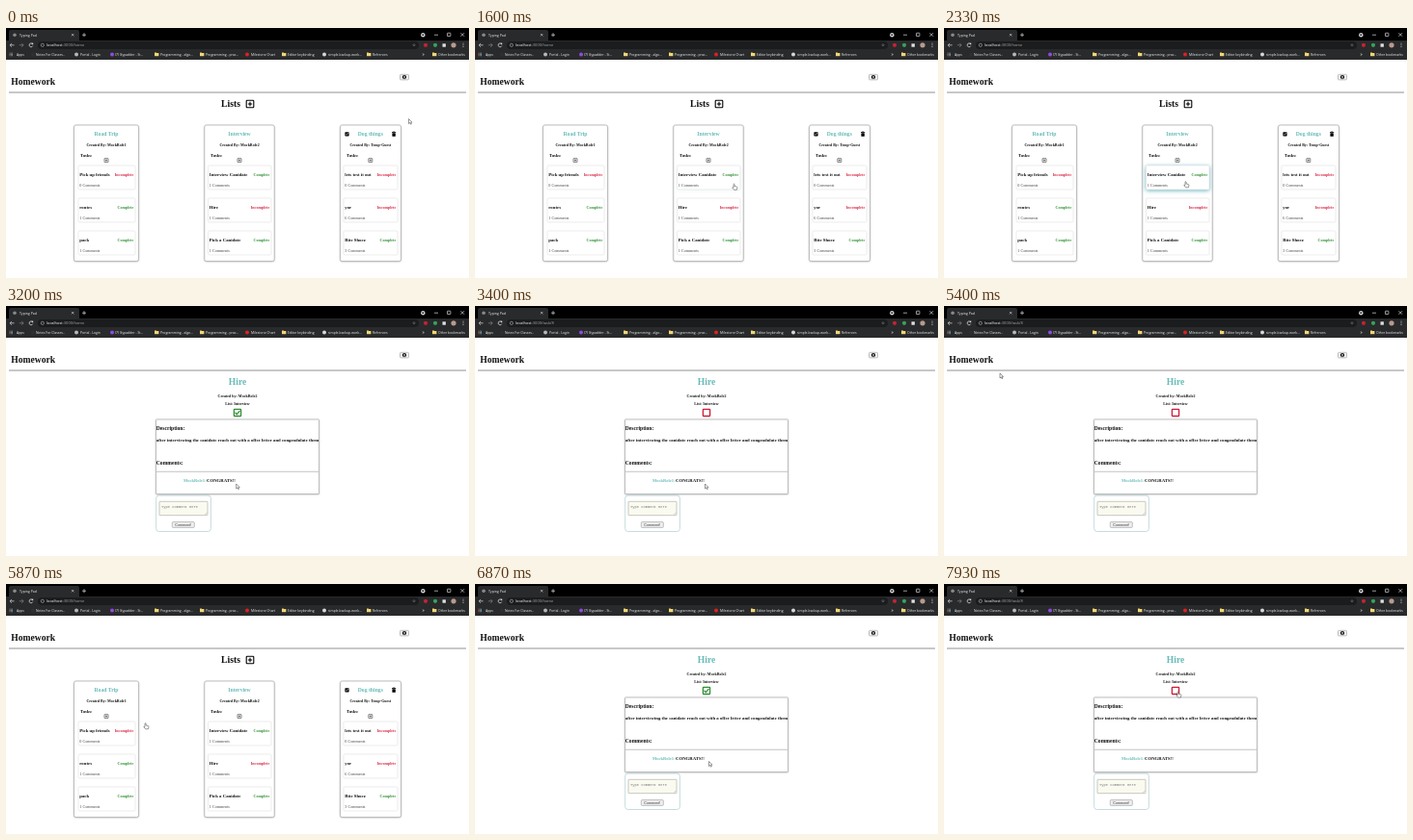
Write an HTML page with a canvas that moves like this. It is 480 px wide and 260 px high and loops after 8000 ms.

```html
<!DOCTYPE html>
<html lang="en">
<head>
<meta charset="utf-8">
<title>Homework lists</title>
<style>
html, body { margin: 0; width: 100%; height: 100%; overflow: hidden; background: #fff; }
canvas { display: block; width: 480px; height: 260px; }
</style>
</head>
<body>
<canvas id="stage" width="480" height="260"></canvas>
<script>
const ctx = document.getElementById('stage').getContext('2d');
const LOOP = 8000;
const SERIF = '"Liberation Serif", serif';
const SANS = '"Open Sans", sans-serif';
const TEAL = '#67bcb8', RED = '#dc2440', GREEN = '#2f9134';
const BAR = '#292a2c';

// Text is set at ten times its size and scaled down for even spacing.
function text(str, x, y, size, { color = '#111', font = SERIF, weight = 'bold', align = 'left' } = {}) {
  ctx.save();
  ctx.translate(x, y);
  ctx.scale(0.1, 0.1);
  ctx.font = `${weight} ${size * 10}px ${font}`;
  ctx.textAlign = align;
  ctx.fillStyle = color;
  ctx.fillText(str, 0, 0);
  ctx.restore();
}
const center = (str, x, y, size, color) => text(str, x, y, size, { color, align: 'center' });
const ui = (str, x, y, size = 3.4, color = '#f4f4f4') =>
  text(str, x, y, size, { color, font: SANS, weight: 'normal' });

function rect(x, y, w, h, color) {
  ctx.fillStyle = color;
  ctx.fillRect(x, y, w, h);
}

function box(x, y, w, h, r, { fill, stroke, width = 1, shadow, blur = 2 } = {}) {
  ctx.save();
  ctx.beginPath();
  ctx.roundRect(x, y, w, h, r);
  if (shadow) {
    ctx.shadowColor = shadow;
    ctx.shadowBlur = blur;
    ctx.shadowOffsetY = blur / 4;
  }
  if (fill) { ctx.fillStyle = fill; ctx.fill(); }
  ctx.shadowColor = 'transparent';
  if (stroke) { ctx.strokeStyle = stroke; ctx.lineWidth = width; ctx.stroke(); }
  ctx.restore();
}
const panel = (x, y, w, h, r) =>
  box(x, y, w, h, r, { fill: '#fff', stroke: '#b4b4b4', width: 0.8, shadow: 'rgba(0,0,0,.4)' });

function dot(x, y, r, color) {
  ctx.fillStyle = color;
  ctx.beginPath();
  ctx.arc(x, y, r, 0, Math.PI * 2);
  ctx.fill();
}

function line(points, color, width = 0.7) {
  ctx.strokeStyle = color;
  ctx.lineWidth = width;
  ctx.beginPath();
  points.forEach(([x, y]) => ctx.lineTo(x, y));
  ctx.stroke();
}

function plusBox(x, y, size, width, color) {
  const h = size / 2, p = size * 0.28;
  box(x - h, y - h, size, size, size * 0.1, { stroke: color, width });
  line([[x - p, y], [x + p, y]], color, width);
  line([[x, y - p], [x, y + p]], color, width);
}

function folder(x) {
  rect(x - 2, 25.5, 2, 1, '#e9c860');
  rect(x - 2, 26, 4.4, 3.2, '#f2d675');
}

const bookmarks = [
  ['dot', 28, '#303030', 'Notes For Classes..', 31],
  ['dot', 73, '#b8b8b8', 'Portal - Login', 77],
  ['dot', 110, '#8f4be0', '(7) lilypadder - St...', 113],
  ['folder', 156, '', 'Programming - algo...', 160],
  ['folder', 203, '', 'Programming - prac...', 207],
  ['dot', 250, '#e02020', 'Milestone Chart', 254],
  ['folder', 288, '', 'Editor keybinding', 292],
  ['dot', 330, '#d8d8d8', 'simple-backup-work...', 334],
  ['folder', 376, '', 'Refrences', 380],
  ['folder', 444, '', 'Other bookmarks', 448]
];

function drawBrowser(path) {
  const pale = '#dedede';
  rect(0, 0, 480, 13, '#000');
  rect(0, 13, 480, 20, BAR);
  box(3, 2, 73, 12, [2, 2, 0, 0], { fill: BAR });
  dot(9, 7.3, 1.8, '#8a8a8a');
  ui('Typing Pad', 14, 8.6, 3.5);
  line([[68, 6], [70.4, 8.4]], pale, 0.6);
  line([[70.4, 6], [68, 8.4]], pale, 0.6);
  line([[79, 7.2], [83, 7.2]], pale);
  line([[81, 5.2], [81, 9.2]], pale);
  dot(432.3, 7.2, 2.2, '#d4d4d4');
  dot(432.3, 7.2, 0.9, '#222');
  line([[444, 7.2], [448, 7.2]], pale);
  box(457.5, 5.2, 3.4, 3.4, 0.4, { stroke: pale, width: 0.7 });
  line([[471.5, 5.2], [475, 8.7]], pale);
  line([[475, 5.2], [471.5, 8.7]], pale);

  line([[8.5, 17.8], [4.2, 17.8]], pale);
  line([[6, 15.9], [4.1, 17.8], [6, 19.7]], pale);
  line([[13.8, 17.8], [18, 17.8]], '#888');
  line([[16.2, 15.9], [18.1, 17.8], [16.2, 19.7]], '#888');
  ctx.strokeStyle = pale;
  ctx.lineWidth = 0.8;
  ctx.beginPath();
  ctx.arc(26, 17.8, 1.9, 0.4, 5.5);
  ctx.stroke();
  rect(26.7, 15.6, 1.5, 1.5, pale);
  box(33, 14, 395, 8, 4, { fill: '#1b1c1e' });
  box(36.2, 16.2, 3.2, 3.2, 1.6, { stroke: '#bbb', width: 0.6 });
  ui('localhost', 42, 19.4, 4, '#fff');
  ctx.font = `40px ${SANS}`;
  ui(':3000/' + path, 42 + ctx.measureText('localhost').width / 10, 19.4, 4, '#a8a8a8');
  ui('☆', 421, 19.4, 4.5);
  dot(435, 17.8, 2.1, '#c52333');
  dot(445, 17.8, 2.1, '#35a45a');
  rect(452.5, 16.3, 3.4, 3.4, pale);
  dot(464, 17.8, 2.6, '#b99a8d');
  for (const y of [16, 17.8, 19.6]) dot(474, y, 0.5, pale);

  for (let i = 0; i < 9; i++)
    rect(3.5 + (i % 3) * 1.3, 25.7 + Math.floor(i / 3) * 1.3, 0.9, 0.9, ['#dc6a60', '#71b77d', '#7198d8'][i % 3]);
  ui('Apps', 11, 28.8);
  for (const [kind, x, color, label, labelX] of bookmarks) {
    if (kind === 'dot') dot(x, 27.4, 2, color);
    else folder(x);
    ui(label, labelX, 28.8);
  }
  ui('»', 431.5, 28.9, 4.5);
}

function drawHeader() {
  text('Homework', 5.3, 59.2, 9.6);
  box(408.5, 48.3, 9, 5.6, 1, { fill: '#f2f2f2', stroke: '#999', width: 0.6 });
  dot(413, 51.1, 2.1, '#000');
  dot(413, 50.4, 0.65, '#fff');
  rect(412, 51.5, 2, 0.8, '#fff');
  rect(3, 66.5, 474, 1, '#929292');
}

const lists = [
  { title: 'Road Trip', by: 'MockRole1', x: 70.5, w: 67, mid: 104, label: 77, left: 75, right: 134,
    tasks: [['Pick up friends', 0, 0], ['routes', 1, 1], ['pack', 1, 1]] },
  { title: 'Interview', by: 'MockRole2', x: 205.8, w: 72.4, mid: 242, label: 212, left: 209.5, right: 275,
    tasks: [['Interview Canidate', 1, 1], ['Hire', 0, 1], ['Pick a Canidate', 1, 1]] },
  { title: 'Dog things', by: 'Temp-Guest', x: 346.5, w: 63, mid: 377.8, label: 353, left: 350, right: 406,
    tasks: [['lets test it out', 0, 0], ['yor', 0, 6], ['Bite Shoez', 1, 3]] }
];
const rowTop = row => 143 + row * 34;

// Share of the last 100 ms that the pointer spent over a task.
function hoverLevel(t, list, row) {
  let inside = 0;
  for (let back = 0; back < 100; back += 10) {
    const [x, y] = pointerAt(Math.max(0, t - back));
    if (x > list.left && x < list.right && y > rowTop(row) && y < rowTop(row) + 25) inside++;
  }
  return inside / 10;
}

function drawTask(list, row, hover) {
  const [name, done, comments] = list.tasks[row];
  const y = rowTop(row), w = list.right - list.left;
  box(list.left, y, w, 25, 1.2, {
    fill: '#fff', stroke: '#e4e4e4', width: 0.7,
    shadow: hover && `rgba(40, 150, 165, ${hover * 0.8})`, blur: 4
  });
  text(name, list.left + 1.3, y + 11.2, 4.8);
  text(done ? 'Complete' : 'Incomplete', list.right - 1.7, y + 10.7, 4.1,
    { color: done ? GREEN : RED, align: 'right' });
  text(comments + ' Comments', list.left + 1.3, y + 21.9, 4.15, { color: '#444', weight: 'normal' });
}

function drawHome(t) {
  text('Lists', 223, 82, 9.7);
  plusBox(253, 79, 7.6, 1.1, '#000');
  for (const list of lists) {
    panel(list.x, 101, list.w, 141.5, 2);
    center(list.title, list.mid, 112, 5.7, TEAL);
    center('Created By: ' + list.by, list.mid, 122.5, 4);
    text('Tasks:', list.label, 133.8, 4.6);
    plusBox(list.mid, 137.6, 4, 0.55, '#222');
    list.tasks.forEach((_, row) => drawTask(list, row, hoverLevel(t, list, row)));
  }
  box(351.4, 108.2, 4.2, 4.2, 0.6, { fill: '#000' });
  line([[352.3, 110.5], [353.2, 111.3], [355, 109.1]], '#fff', 0.6);
  rect(400, 108, 4.2, 0.8, '#000');
  rect(401.4, 107.5, 1.4, 0.7, '#000');
  box(400.4, 109.2, 3.4, 3.6, 0.4, { fill: '#000' });
}

function drawTaskPage(done) {
  center('Hire', 240, 81.8, 9.6, TEAL);
  center('Created by: MockRole2', 240, 95.4, 4);
  center('List: Interview', 240, 103.3, 4);
  const mark = done ? GREEN : '#cf1b36';
  box(236.4, 107.3, 7.2, 7.2, 0.5, { fill: '#fff', stroke: mark, width: 1.3 });
  if (done) line([[237.6, 110.8], [239.3, 112.6], [242.5, 108.9]], mark, 1.3);

  box(155.6, 197, 56.8, 37.5, 3, { fill: '#fff', stroke: '#b9d4d7', width: 0.8 });
  panel(155.5, 118, 169, 77.5, 0.6);
  text('Description:', 155.8, 128.8, 5.6);
  text('after interviewing the canidate reach out with a offer letter and congradulate them', 155.8, 141.2, 4.79);
  text('Comments:', 155.8, 164.7, 5.6);
  rect(156, 171.8, 168, 0.8, '#b4b4b4');
  text('MockRole1:', 184, 182.8, 4.5, { color: TEAL });
  text('CONGRATS!!', 208, 182.8, 4.75);

  box(159, 203.3, 50, 14.4, 0.5, { fill: '#fafaf0', stroke: '#b2b2a8', width: 0.7 });
  text('Type Comment Here', 161, 209.8, 3.73, { color: '#777', font: '"Liberation Mono", monospace', weight: 'normal' });
  line([[206.3, 217], [208.4, 214.9]], '#888', 0.4);
  box(172.3, 224.6, 23, 5.8, 0.8, { fill: '#efefef', stroke: '#999', width: 0.6 });
  text('Comment!', 183.8, 228.8, 3.7, { font: '"Liberation Sans", sans-serif', weight: 'normal', align: 'center', color: '#333' });
}

// time, x, y of the pointer tip
const track = [
  [0, 417.5, 94.5], [1399, 417.5, 94.5], [1400, 277, 149], [1590, 277, 149],
  [1600, 268, 162], [1730, 246, 209.5], [1925, 246, 209.5], [2130, 249, 178],
  [2330, 250, 159.5], [2470, 250, 164], [2670, 243, 208], [2795, 243, 208],
  [2930, 239, 185], [3400, 238.5, 185], [4000, 242, 111], [4070, 242, 111],
  [4270, 244.5, 113.3], [4540, 244.5, 113.3], [4600, 246.8, 117.3], [4800, 254, 165],
  [4940, 242, 203], [5400, 58, 70], [5600, 5, 17], [5700, 5, 17],
  [5870, 144, 144.5], [6130, 236, 219], [6265, 236, 219], [6530, 242.5, 184.5],
  [6870, 242.5, 184.5], [7670, 242, 111.7], [LOOP, 242, 111.7]
];

function pointerAt(t) {
  const i = track.findIndex(key => key[0] > t);
  const [t0, x0, y0] = track[i - 1], [t1, x1, y1] = track[i];
  const k = (t - t0) / (t1 - t0);
  return [x0 + (x1 - x0) * k, y0 + (y1 - y0) * k];
}

const arrowPath = new Path2D('M0 0V5L1.2 3.9L2 5.7L2.8 5.3L2.1 3.6H3.5Z');
const handPath = new Path2D('M0 .6Q.6 -.4 1.1 .6V2.5L3.5 3.1Q4.1 3.4 3.9 4.4L3.4 6.3H.6L-1.2 4.2Q-.9 3.2 0 4.1Z');

function drawPointer(t, onHome) {
  const [x, y] = pointerAt(t);
  const overBox = !onHome && x > 235 && x < 245 && y < 115 && y > 106;
  const hand = overBox || onHome && t > 1590 && !(t > 5600 && t < 5750);
  const path = hand ? handPath : arrowPath;
  ctx.save();
  ctx.translate(x, y);
  ctx.fillStyle = '#fff';
  ctx.strokeStyle = '#444';
  ctx.lineWidth = 0.55;
  ctx.fill(path);
  ctx.stroke(path);
  ctx.restore();
}

function render(now) {
  const t = now % LOOP;
  const onHome = t < 3200 || t >= 5670 && t < 6865;
  const loading = t >= 3200 && t < 3267 || t >= 6865 && t < 6935;
  rect(0, 0, 480, 260, '#fff');
  drawBrowser(onHome || loading ? 'home' : 'task/8');
  drawHeader();
  if (onHome) drawHome(t);
  else drawTaskPage(loading);
  drawPointer(t, onHome);
}

let start;
function tick(now) {
  start ??= now;
  render(Math.max(0, now - start));
  requestAnimationFrame(tick);
}
render(0);
requestAnimationFrame(tick);
</script>
</body>
</html>
```
